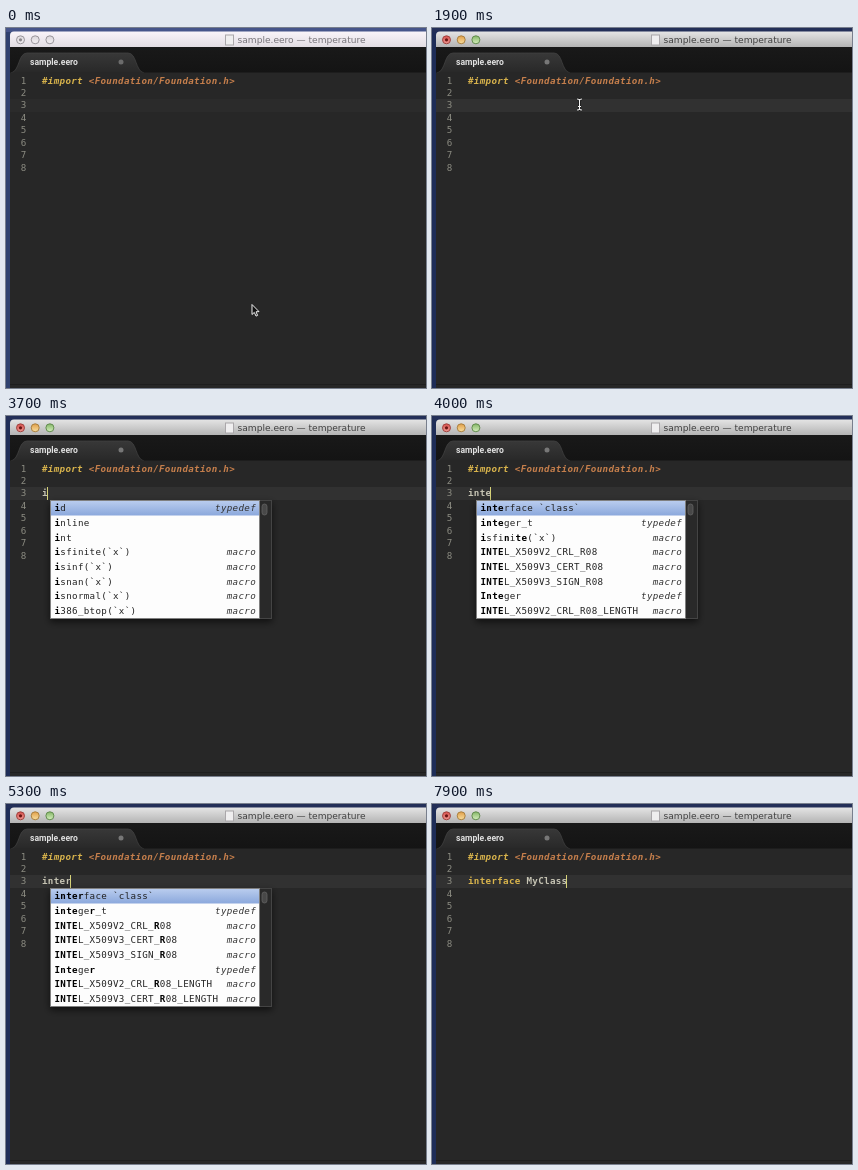
These frames come from a looping animation (420x360 px, 8000 ms). An HTML page with a canvas:

```html
<!DOCTYPE html>
<html lang="en">
<head>
<meta charset="utf-8">
<title>Editor autocomplete</title>
<style>
html, body { margin: 0; width: 420px; height: 360px; overflow: hidden; background: #272727; }
canvas { display: block; }
</style>
</head>
<body>
<canvas id="stage" width="420" height="360"></canvas>
<script>
const ctx = document.getElementById('stage').getContext('2d');
const LOOP = 8000;
const MONO = '9.2px "DejaVu Sans Mono", monospace';
const BOLD = 'bold ' + MONO;
const CHAR = 5.85, TEXT_X = 36, LINE_Y = 80.4, ROW = 14.67;
const ACTIVATE = 1600, IBEAM = 1800, FIRST_KEY = 3400, ACCEPT = 5500, REPLACE = 5900;
const KEYWORD = '#d9b44c', PLAIN = '#c6c4b4';

const typed = [[3400, 'i'], [3800, 'in'], [3900, 'int'], [4000, 'inte'], [4200, 'inter']];
const named = [[5900, 'M'], [6600, 'My'], [7200, 'MyCl'], [7400, 'MyCla'], [7900, 'MyClass']];
const completions = [
  ['id', 'typedef'], ['inline', ''], ['int', ''],
  ...['isfinite', 'isinf', 'isnan', 'isnormal', 'i386_btop'].map(n => [n + '(`x`)', 'macro']),
  ['interface `class`', ''], ['integer_t', 'typedef'],
  ['INTEL_X509V2_CRL_R08', 'macro'], ['INTEL_X509V3_CERT_R08', 'macro'],
  ['INTEL_X509V3_SIGN_R08', 'macro'], ['Integer', 'typedef'],
  ['INTEL_X509V2_CRL_R08_LENGTH', 'macro'], ['INTEL_X509V3_CERT_R08_LENGTH', 'macro']
];

const latest = (steps, t) => steps.reduce((s, [at, value]) => t >= at ? value : s, '');

function rect(x, y, w, h, color) {
  ctx.fillStyle = color;
  ctx.fillRect(x, y, w, h);
}

function text(s, x, y, color, font = MONO, align = 'left') {
  ctx.font = font;
  ctx.textAlign = align;
  ctx.fillStyle = color;
  ctx.fillText(s, x, y);
}

// Monospaced text on the character grid.
function code(s, x, y, color, font = MONO) {
  [...s].forEach((c, i) => text(c, x + i * CHAR, y, color, font));
}

function vertical(y0, y1, ...colors) {
  const g = ctx.createLinearGradient(0, y0, 0, y1);
  colors.forEach((c, i) => g.addColorStop(i / (colors.length - 1), c));
  return g;
}

function disc(x, y, r, fill, stroke) {
  ctx.beginPath();
  ctx.arc(x, y, r, 0, Math.PI * 2);
  ctx.fillStyle = fill;
  ctx.fill();
  if (stroke) {
    ctx.strokeStyle = stroke;
    ctx.lineWidth = 1;
    ctx.stroke();
  }
}

function drawTitleBar(active) {
  rect(0, 0, 420, 360, active ? '#1e2d58' : '#30426f');
  rect(0, 0, 420, 4, active ? '#232f58' : '#46558a');
  ctx.fillStyle = active ? vertical(3, 19, '#e6e6e6', '#b4b4b4') : vertical(3, 19, '#faf5fa', '#e2dde3');
  ctx.beginPath();
  ctx.roundRect(4, 3.5, 430, 20, 4);
  ctx.fill();

  const lights = active
    ? [['#d8524e', '#f09a94'], ['#e2a04a', '#f8e0a0'], ['#86b868', '#d8f0c0']]
    : Array(3).fill(['#dcd8dc', '#f2eef2']);
  const rims = active ? ['#a04440', '#a98040', '#638c50'] : Array(3).fill('#99959b');
  lights.forEach((c, i) => disc(14.5 + i * 14.7, 11.8, 4, vertical(8, 16, ...c), rims[i]));
  disc(14.5, 11.8, 1.6, active ? '#6a1513' : '#8a868c');

  rect(219, 6.5, 9, 11, '#aaa7aa');
  rect(220, 7.5, 7, 9, '#efeeef');
  text('sample.eero — temperature', 231.5, 15, active ? '#404040' : '#77747a', '9.08px "DejaVu Sans", sans-serif');
}

function drawTabs(active) {
  rect(4, 19, 416, 26, vertical(19, 44, '#191919', '#141414'));
  ctx.beginPath();
  ctx.moveTo(5, 45);
  ctx.bezierCurveTo(14, 43, 12, 25, 21, 25);
  ctx.lineTo(122, 25);
  ctx.bezierCurveTo(131, 25, 129, 43, 138, 45);
  ctx.fillStyle = vertical(25, 45, '#383838', '#282828');
  ctx.fill();
  ctx.strokeStyle = '#404040';
  ctx.lineWidth = 0.8;
  ctx.stroke();
  text('sample.eero', 24, 36.8, '#e0e0e0', 'bold 8.6px Roboto, sans-serif');
  disc(115, 34, 2.5, active ? '#777' : '#6c6c6c');
}

function drawEditor(active) {
  rect(4, 44.5, 416, 316, '#272727');
  rect(4, 71, 416, 13, active ? '#313131' : '#2b2b2b');
  rect(4, 356, 416, 1, '#1e1e1e');
  for (let n = 1; n <= 8; n++) text(n, 20.3, 43.1 + n * 12.44, '#8c8c82', MONO, 'right');
  code('#import', TEXT_X, 55.5, KEYWORD, 'italic ' + BOLD);
  code('<Foundation/Foundation.h>', TEXT_X + 8 * CHAR, 55.5, '#c67f4c', 'italic ' + BOLD);
}

function drawCaret(column) {
  rect(Math.round(TEXT_X + column * CHAR - 1), 71, 1, 13, '#d6d278');
}

function drawCode(t) {
  if (t < ACCEPT) {
    const word = latest(typed, t);
    code(word, TEXT_X, LINE_Y, PLAIN, BOLD);
    const blink = t < FIRST_KEY ? t >= 2300 && t < 2800 : t < 4700 || t >= 5200;
    if (blink) drawCaret(word.length);
    return;
  }
  code('interface', TEXT_X, LINE_Y, KEYWORD, BOLD);
  const nameX = TEXT_X + 10 * CHAR;
  if (t < REPLACE) {
    rect(nameX, 71, 5 * CHAR, 13, '#4d4d49');
    code('class', nameX, LINE_Y, PLAIN, BOLD);
  } else {
    const name = latest(named, t);
    code(name, nameX, LINE_Y, PLAIN, BOLD);
    drawCaret(10 + name.length);
  }
}

// Prefers adjacent letters, then word starts, then any later letter.
function fuzzyMatch(name, query) {
  const s = name.toLowerCase(), hits = [];
  let pos = 0;
  for (const c of query) {
    const word = s.indexOf('_' + c, pos);
    const at = s[pos] === c ? pos : word >= 0 ? word + 1 : s.indexOf(c, pos);
    if (at < 0) return null;
    hits.push(at);
    pos = at + 1;
  }
  return hits;
}

function drawPopup(query) {
  const rows = completions
    .map(([name, kind]) => ({ name, kind, hits: fuzzyMatch(name, query) }))
    .filter(r => r.hits)
    .sort((a, b) => b.name.startsWith(query) - a.name.startsWith(query))
    .slice(0, 8);

  ctx.save();
  ctx.shadowColor = 'rgba(0,0,0,.6)';
  ctx.shadowBlur = 7;
  ctx.shadowOffsetY = 3;
  rect(44, 84, 222, 119, '#444');
  ctx.restore();
  rect(44, 84, 210, 119, '#808080');
  rect(45, 85, 208, 117, '#fdfdfd');
  rect(45, 85, 208, 14.5, vertical(85, 99.5, '#b9ccee', '#8ba8dc'));
  rect(254, 85, 11, 117, '#292929');
  ctx.beginPath();
  ctx.roundRect(256, 88, 5, 11, 2.5);
  ctx.fillStyle = '#484848';
  ctx.fill();
  ctx.strokeStyle = '#646464';
  ctx.lineWidth = 0.8;
  ctx.stroke();

  rows.forEach(({ name, kind, hits }, i) => {
    const y = 95.2 + i * ROW;
    [...name].forEach((c, k) => {
      const hit = hits.includes(k);
      text(c, 48.5 + k * CHAR, y, hit ? '#000' : '#222', hit ? BOLD : MONO);
    });
    code(kind, 250 - kind.length * CHAR, y, '#333', 'italic ' + MONO);
  });
}

function drawArrow(x, y) {
  ctx.beginPath();
  [[0, 0], [0, 10], [2.3, 7.9], [4, 11.6], [5.6, 10.9], [4, 7.3], [7, 7.1]]
    .forEach(([dx, dy]) => ctx.lineTo(x + dx, y + dy));
  ctx.closePath();
  ctx.fillStyle = '#111';
  ctx.fill();
  ctx.strokeStyle = '#f0f0f0';
  ctx.lineWidth = 1;
  ctx.stroke();
}

function drawIBeam(x, y) {
  ctx.beginPath();
  for (const s of [-1, 1]) {
    ctx.moveTo(x - 2.5, y + s * 5.5);
    ctx.quadraticCurveTo(x, y + s * 5.5, x, y + s * 4);
    ctx.quadraticCurveTo(x, y + s * 5.5, x + 2.5, y + s * 5.5);
  }
  ctx.moveTo(x, y - 5);
  ctx.lineTo(x, y + 5);
  ctx.moveTo(x - 1.5, y + 2);
  ctx.lineTo(x + 1.5, y + 2);
  for (const [color, width] of [['#111', 2.6], ['#f4f4f4', 1.1]]) {
    ctx.strokeStyle = color;
    ctx.lineWidth = width;
    ctx.stroke();
  }
}

function drawPointer(t) {
  if (t >= FIRST_KEY) return;
  if (t >= IBEAM) return drawIBeam(147.5, 76.5);
  const p = Math.min(1, Math.max(0, (t - 100) / 1100));
  const e = p * p * (3 - 2 * p);
  drawArrow(246 - 99 * e, 276.5 - 203 * e);
}

function frame(now) {
  const t = now % LOOP;
  const active = t >= ACTIVATE;
  drawTitleBar(active);
  drawTabs(active);
  drawEditor(active);
  drawCode(t);
  if (t >= 3500 && t < ACCEPT) drawPopup(latest(typed, t));
  drawPointer(t);
  requestAnimationFrame(frame);
}
frame(performance.now());
</script>
</body>
</html>
```
